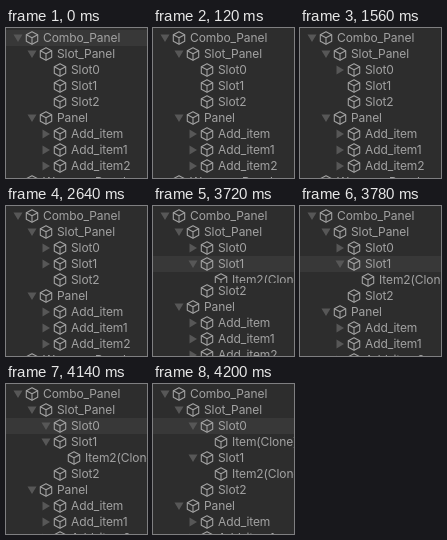
An HTML page with a canvas for the animation above (4920 ms loop, 141 by 150 pixels).

```html
<!DOCTYPE html>
<html lang="en">
<head>
<meta charset="utf-8">
<title>Hierarchy tree</title>
<style>
  html, body { margin: 0; width: 100%; height: 100%; overflow: hidden; background: #2d2d2d; }
  canvas { display: block; width: 141px; height: 150px; }
</style>
</head>
<body>
<canvas id="tree"></canvas>
<script>
const W = 141, H = 150, ROW = 16, INDENT = 14, LOOP = 4920;
const BG = '#2d2d2d', HOVER = '#383838', INK = '#a2a2a2', ARROW = '#575757';

// [start ms, hovered row, Slot0 arrow, Slot1 arrow, Slot0 child height, Slot1 child height]
const steps = [
  [0, 'Combo_Panel', '', '', 0, 0],
  [60, 'Slot0', '', '', 0, 0],
  [120, '', '', '', 0, 0],
  [1560, '', 'right', '', 0, 0],
  [2640, '', 'right', 'right', 0, 0],
  [3720, 'Slot1', 'right', 'down', 0, 11],
  [3780, 'Slot1', 'right', 'down', 0, 16],
  [4140, 'Slot0', 'down', 'down', 0, 16],
  [4200, 'Slot0', 'down', 'down', 16, 16]
];

const canvas = document.getElementById('tree');
const ctx = canvas.getContext('2d');
const dpr = window.devicePixelRatio || 1;
canvas.width = W * dpr;
canvas.height = H * dpr;
ctx.scale(dpr, dpr);

function trace(points) {
  ctx.beginPath();
  points.forEach(([x, y], i) => i ? ctx.lineTo(x, y) : ctx.moveTo(x, y));
}

function drawArrow(x, y, dir) {
  trace(dir === 'down'
    ? [[x - 4.5, y - 3.5], [x + 4.5, y - 3.5], [x, y + 4]]
    : [[x - 3.5, y - 4.5], [x + 4, y], [x - 3.5, y + 4.5]]);
  ctx.fillStyle = ARROW;
  ctx.fill();
}

function drawCube(x, y) {
  ctx.strokeStyle = INK;
  ctx.lineWidth = 1.1;
  ctx.lineJoin = 'round';
  trace([[x, y - 6.3], [x + 5.7, y - 3.3], [x + 5.7, y + 3.3],
    [x, y + 6.3], [x - 5.7, y + 3.3], [x - 5.7, y - 3.3]]);
  ctx.closePath();
  ctx.stroke();
  trace([[x - 5.7, y - 3.3], [x, y - 0.3], [x + 5.7, y - 3.3]]);
  ctx.moveTo(x, y - 0.3);
  ctx.lineTo(x, y + 6.3);
  ctx.stroke();
}

function drawRow(label, level, top, arrow, height, hovered) {
  const x = 12 + level * INDENT, y = top + 8;
  ctx.save();
  ctx.beginPath();
  ctx.rect(0, top, W, height);
  ctx.clip();
  if (hovered) {
    ctx.fillStyle = HOVER;
    ctx.fillRect(0, top, W, height);
  }
  if (arrow) drawArrow(x, y, arrow);
  drawCube(x + 14, y);
  ctx.fillStyle = INK;
  ctx.fillText(label, x + 25, y + 4);
  ctx.restore();
}

function draw(t) {
  const [, hover, arrow0, arrow1, open0, open1] = steps.findLast(s => s[0] <= t);
  ctx.fillStyle = BG;
  ctx.fillRect(0, 0, W, H);
  ctx.font = '12px Inter, "Liberation Sans", sans-serif';
  ctx.letterSpacing = '-0.1px';
  let top = 2;
  const row = (label, level, arrow, height = ROW) => {
    if (height) drawRow(label, level, top, arrow, height, label === hover);
    top += height;
  };
  row('Combo_Panel', 0, 'down');
  row('Slot_Panel', 1, 'down');
  row('Slot0', 2, arrow0);
  row('Item(Clone)', 3, '', open0);
  row('Slot1', 2, arrow1);
  row('Item2(Clone)', 3, '', open1);
  row('Slot2', 2);
  row('Panel', 1, 'down');
  row('Add_item', 2, 'right');
  row('Add_item1', 2, 'right');
  row('Add_item2', 2, 'right');
  row('Weapon_Panel', 0, 'down');
}

function tick() {
  draw(performance.now() % LOOP);
  requestAnimationFrame(tick);
}
tick();
</script>
</body>
</html>
```
